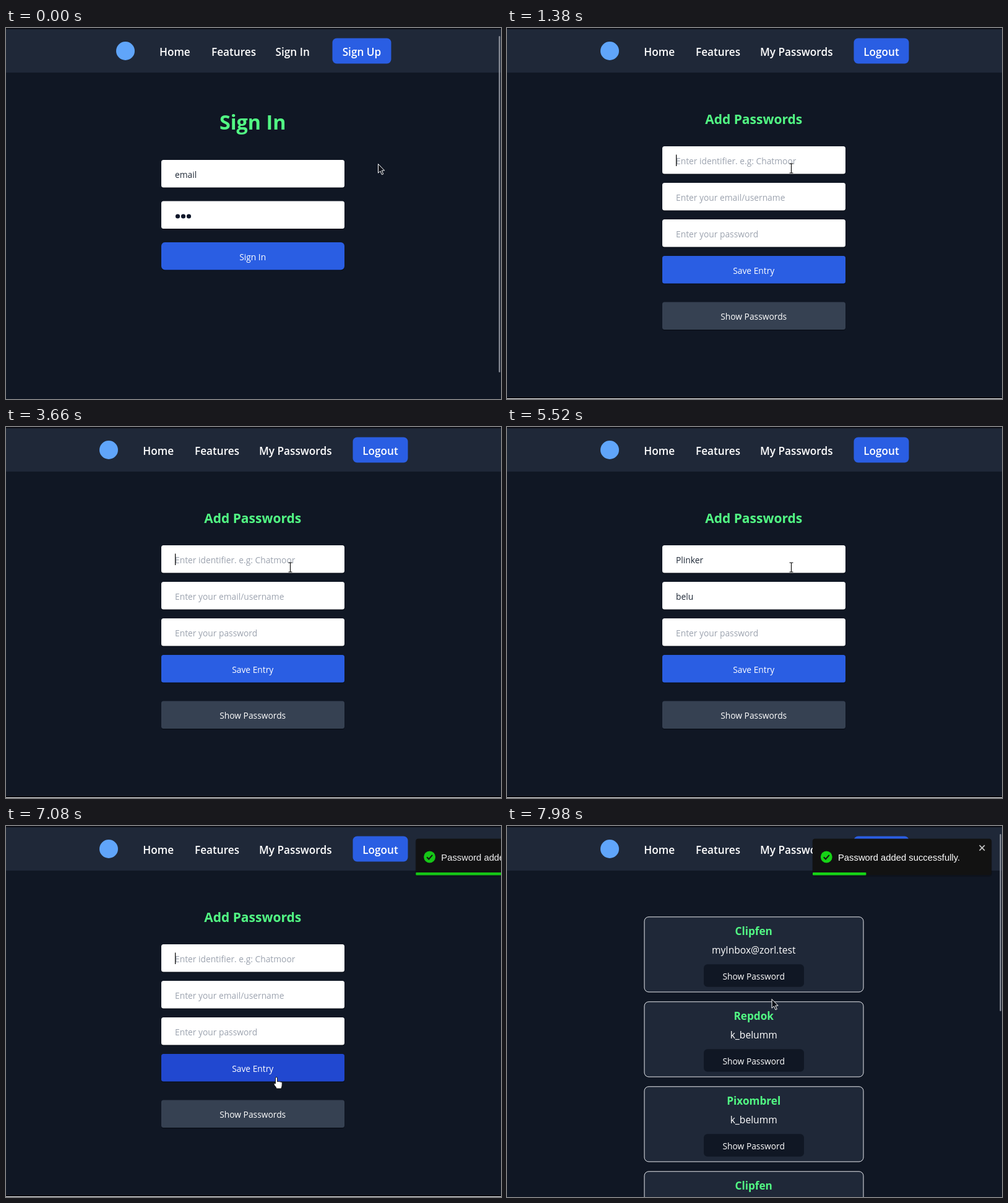
Animation, 800 px wide and 599 px high, one loop 8 s. Source, as an HTML page:

```html
<!DOCTYPE html>
<html lang="en">
<head>
<meta charset="utf-8">
<title>Password manager demo</title>
<style>
  html, body { margin: 0; width: 100%; height: 100%; overflow: hidden; background: #101724; }
  svg { display: block; width: 100%; height: 100%; }
  text { font-family: "Open Sans", "Noto Sans", sans-serif; font-size: 13.8px; fill: #fff; white-space: pre; }
  .nav { font-size: 17.2px; font-weight: 600; }
  .big { font-size: 32.3px; font-weight: 700; fill: #52fa84; }
  .head { font-size: 21px; font-weight: 700; fill: #52fa84; }
  .site { font-size: 17.2px; font-weight: 700; fill: #52fa84; }
  .user { font-size: 15.6px; }
  .toast { font-family: "Liberation Sans", Arial, sans-serif; font-size: 14.8px; }
</style>
</head>
<body>
<svg id="stage" viewBox="0 0 800 599"></svg>
<script>
const LOOP = 8000, SIGNED_IN = 720, LISTED = 7700, TOAST_IN = 6955, BAR_START = 7245, BAR_MS = 1050;
const PAGE = '#101724', PANEL = '#1f2838', BLUE = '#2a5ee3', MID = 398.7;
const stage = document.getElementById('stage');

function add(parent, tag, attrs, content) {
  const el = document.createElementNS('http://www.w3.org/2000/svg', tag);
  for (const k in attrs) el.setAttribute(k, attrs[k]);
  if (content) el.textContent = content;
  parent.append(el);
  return el;
}
const rect = (p, x, y, width, height, fill, rx = 0, more) =>
  add(p, 'rect', { x, y, width, height, fill, rx, ...more });
const label = (p, x, y, str, cls = '') => add(p, 'text', { x, y, class: cls }, str);
const centred = (p, x, y, str, cls = '') =>
  add(p, 'text', { x, y, class: cls, 'text-anchor': 'middle' }, str);
const show = (el, on) => el.setAttribute('visibility', on ? 'visible' : 'hidden');

function bar(p, logoX, links, btnX, btnW, btnText) {
  add(p, 'circle', { cx: logoX, cy: 37, r: 15, fill: '#60a5fa' });
  for (const [x, str] of links) label(p, x, 45.3, str, 'nav');
  rect(p, btnX, 16.5, btnW, 41, BLUE, 7);
  centred(p, btnX + btnW / 2, 45.3, btnText, 'nav');
}
function box(p, y, fill, rx = 3.5) {
  rect(p, 251, y + 1.5, 296, 44.5, '#0a0f19', rx);
  return rect(p, 251, y, 296, 44.5, fill, rx);
}
function button(p, y, str, fill, rx) {
  const el = box(p, y, fill, rx);
  centred(p, MID, y + 28.7, str);
  return el;
}
function dots(p, y, n) {
  return Array.from({ length: n }, (_, i) =>
    add(p, 'circle', { cx: 277.5 + 9 * i, cy: y, r: 3.6, fill: '#0f172a' }));
}
const scrollbar = (p, bottom) => rect(p, 796.5, 13, 2, bottom - 13, '#979ca6', 1);

rect(stage, 0, 0, 800, 599, PAGE);
rect(stage, 0, 0, 800, 2, '#0a0d15');
rect(stage, 0, 2, 800, 70, PANEL);

// Sign-in page
const signin = add(stage, 'g');
bar(signin, 193, [[248, 'Home'], [332, 'Features'], [435.5, 'Sign In']], 527.5, 95, 'Sign Up');
centred(signin, MID, 164, 'Sign In', 'big');
box(signin, 213, '#fff');
label(signin, 273, 241.5, 'email').style.fill = '#1f2937';
box(signin, 279.5, '#fff');
dots(signin, 304, 3);
const enter = button(signin, 346, 'Sign In', BLUE, 6);
scrollbar(signin, 556);

// Pages behind the login share one bar
const inside = add(stage, 'g');
bar(inside, 166, [[221.3, 'Home'], [305, 'Features'], [409, 'My Passwords']], 560.5, 89, 'Logout');

const form = add(stage, 'g');
centred(form, MID, 155, 'Add Passwords', 'head');
const fields = [
  { y: 191, hint: 'Enter identifier. e.g: Chatmoor', value: 'Plinker', start: 4000, step: 75 },
  { y: 250, hint: 'Enter your email/username', value: 'belumm', start: 4860, step: 180 },
  { y: 309, hint: 'Enter your password', value: '      ', start: 5920, step: 55, secret: true }
];
for (const f of fields) {
  box(form, f.y, '#fff');
  f.text = label(form, 273, f.y + 28.5, f.hint);
  if (f.secret) f.dots = dots(form, f.y + 24.5, f.value.length);
}
const save = button(form, 368, 'Save Entry', BLUE);
const reveal = button(form, 442.5, 'Show Passwords', '#364152');
const caret = rect(form, 273, 0, 1.3, 18.5, '#111');
rect(form, 0, 596, 800, 2, '#090c13');
rect(form, 0, 598, 800, 1, '#f4f4f4');

// Saved entries
const list = add(stage, 'g');
[['Clipfen', 'myInbox@zorl.test'], ['Repdok', 'k_belumm'],
 ['Pixombrel', 'k_belumm'], ['Clipfen', 'k_belumm']].forEach(([site, user], i) => {
  const y = 146.8 + 137 * i;
  rect(list, 222, y, 354, 121.2, PANEL, 7, { stroke: '#e8eaee' });
  centred(list, MID, y + 29, site, 'site');
  centred(list, MID, y + 58.7, user, 'user');
  rect(list, 318, y + 76.5, 162, 36.5, PAGE, 6);
  centred(list, MID, y + 101.3, 'Show Password');
});
scrollbar(list, 299);

// Toast
const toast = add(stage, 'g');
rect(toast, 493, 21, 291, 61, '#000', 5, { opacity: .18 });
rect(toast, 494, 20.5, 289, 58.8, '#121212', 4);
add(toast, 'circle', { cx: 516.3, cy: 50, r: 9.4, fill: '#16d316' });
add(toast, 'path', { d: 'M511.8 50.3l3.2 3.2 5.8-6.6', fill: 'none', stroke: '#121212', 'stroke-width': 2 });
label(toast, 535, 55.5, 'Password added successfully.', 'toast');
add(toast, 'path', { d: 'M763.6 31.2l8.4 8.4m0-8.4l-8.4 8.4', stroke: '#c4c4c4', 'stroke-width': 1.7 });
const progress = rect(toast, 494, 75, 289, 4.5, '#16d316', 1);
const slide = toast.animate(
  [[0, 3000, 0], [.6, -25, 1], [.75, 10, 1], [.9, -5, 1], [1, 0, 1]].map(([offset, x, opacity]) =>
    ({ offset, opacity, transform: `translateX(${x}px)`, easing: 'cubic-bezier(.215,.61,.355,1)' })),
  { duration: 340, fill: 'both' });
slide.pause();

// Pointer shapes, each with its hot spot at 0,0
const pointer = add(stage, 'g');
const shapes = {
  arrow: add(pointer, 'path', {
    d: 'M0 0V14.6L3.4 11.5 5.9 17.2 8.3 16.2 5.8 10.6H10.2Z', fill: '#0b0f18', stroke: '#fff' }),
  hand: add(pointer, 'path', {
    d: 'M-1.5 10V1a1.5 1.5 0 0 1 3 0V7q1.3-1.4 2.8 0 1.3-1 2.6.4 1.6-.6 2.3 1V12q0 3-1.5 6H.2q-.6-2.4-3.4-5.4-1.6-2 0-3z',
    fill: '#fff', stroke: '#111', 'stroke-width': .9 }),
  beam: add(pointer, 'path', {
    d: 'M-3-7.5H-.8L0-6.8.8-7.5H3M0-6.8V6.8M-3 7.5H-.8L0 6.8.8 7.5H3', fill: 'none', stroke: '#111', 'stroke-width': 1.2 })
};

// time, x, y
const path = [
  [0, 601.5, 219.5], [480, 440, 372], [860, 440, 372], [1300, 459.5, 226.5], [6250, 459.5, 226.5],
  [6680, 437, 406], [7120, 437, 406], [7480, 446, 460], [7740, 446, 460], [7980, 428, 279.5]
];
// field, focus time, blur time
const focus = [[0, 1320, 4680], [1, 4680, 5820], [2, 5820, 6800], [0, 6900, 7480]];

function position(t) {
  const i = path.findIndex(p => p[0] > t);
  if (i < 0) return path[path.length - 1].slice(1);
  const [t0, x0, y0] = path[i - 1], [t1, x1, y1] = path[i];
  const u = (t - t0) / (t1 - t0), k = u * u * (3 - 2 * u);
  return [x0 + (x1 - x0) * k, y0 + (y1 - y0) * k];
}
const clamp = (v, lo, hi) => Math.min(hi, Math.max(lo, v));

function draw(t) {
  const page = t < SIGNED_IN ? signin : t < LISTED ? form : list;
  for (const p of [signin, form, list]) p.style.display = p === page ? '' : 'none';
  inside.style.display = page === signin ? 'none' : '';

  const [x, y] = position(t);
  const over = (top, h = 44.5, left = 251, w = 296) => x >= left && x <= left + w && y >= top && y <= top + h;
  const onEnter = page === signin && over(346);
  const onSave = page === form && over(368), onReveal = page === form && over(442.5);
  const onCard = page === list && [0, 1, 2].some(i => over(223.3 + 137 * i, 36.5, 318, 162));
  const onField = page === signin ? over(213) || over(279.5) : page === form && fields.some(f => over(f.y));
  const kind = onEnter || onSave || onReveal || onCard ? 'hand' : onField ? 'beam' : 'arrow';
  for (const k in shapes) shapes[k].style.display = k === kind ? '' : 'none';
  pointer.setAttribute('transform', `translate(${x} ${y})`);
  enter.setAttribute('fill', onEnter ? '#2148d0' : BLUE);
  save.setAttribute('fill', onSave ? '#2148d0' : BLUE);
  reveal.setAttribute('fill', onReveal ? '#485566' : '#364152');

  for (const f of fields) {
    const n = t >= 6900 ? 0 : clamp(Math.floor((t - f.start) / f.step) + 1, 0, f.value.length);
    f.text.textContent = !n ? f.hint : f.secret ? '' : f.value.slice(0, n);
    f.text.style.fill = n ? '#1f2937' : '#9ca3af';
    if (f.dots) f.dots.forEach((d, i) => d.style.display = i < n ? '' : 'none');
    f.end = !n ? 273 : f.secret ? 273 + 9 * n : 273.5 + (page === form ? f.text.getComputedTextLength() : 0);
  }
  const now = focus.find(([, a, b]) => t >= a && t < b);
  caret.style.display = now && (t - now[1]) % 540 < 270 ? '' : 'none';
  if (now) {
    const f = fields[now[0]];
    caret.setAttribute('x', f.end);
    caret.setAttribute('y', f.y + 13.5);
  }

  show(toast, t >= TOAST_IN);
  slide.currentTime = clamp(t - TOAST_IN, 0, 340);
  progress.setAttribute('width', 289 * (1 - clamp((t - BAR_START) / BAR_MS, 0, 1)));
}

const begin = performance.now();
function tick() {
  draw((performance.now() - begin) % LOOP);
  requestAnimationFrame(tick);
}
tick();
</script>
</body>
</html>
```
